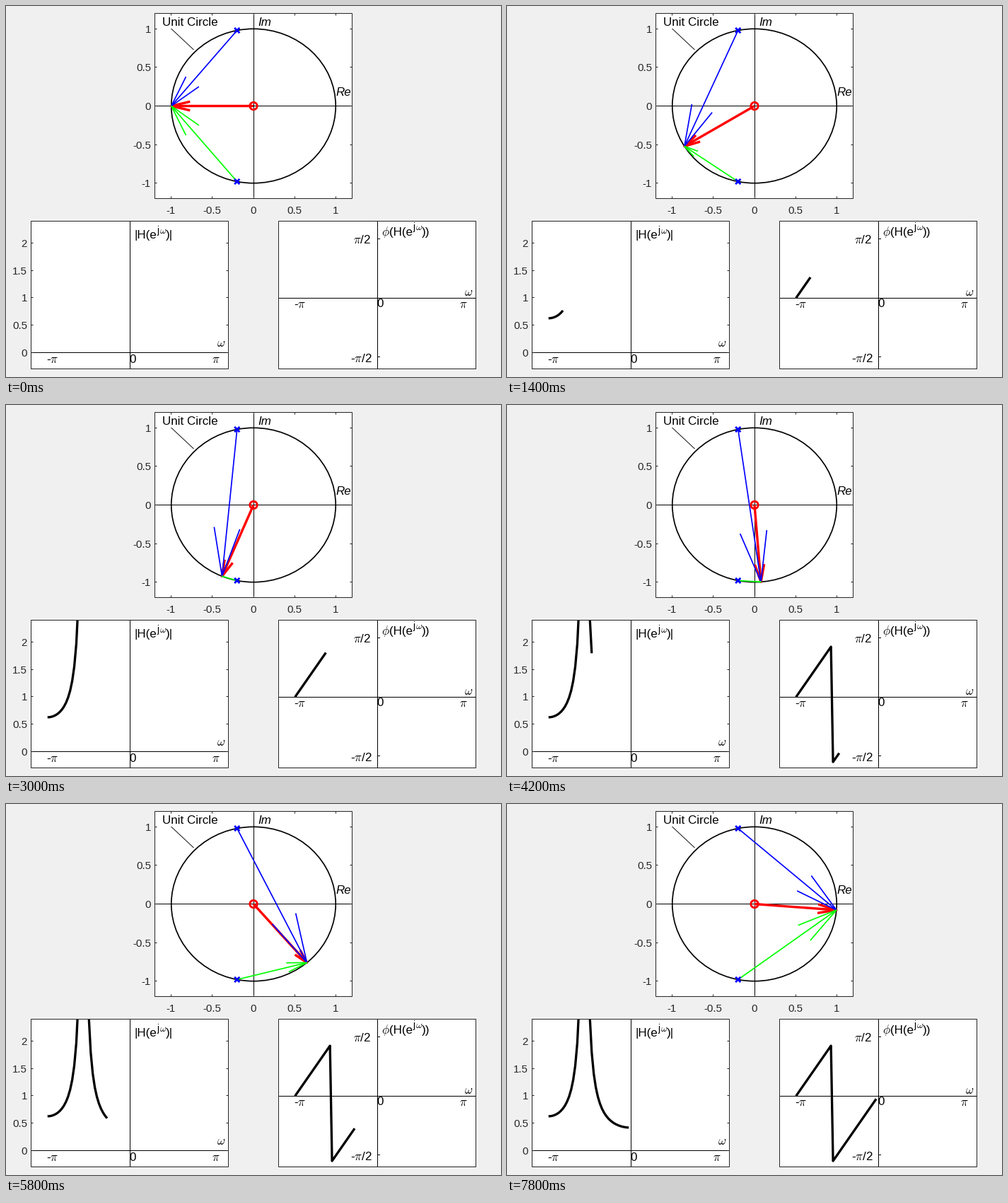
Write a matplotlib script that moves like this. It is 700x525 px and loops after 8 s.

```python
import numpy as np
import matplotlib.pyplot as plt
from matplotlib.animation import FuncAnimation
from matplotlib.patches import Rectangle, Ellipse, Circle

W, H, DPI = 700, 525, 100
FRAMES, INTERVAL = 40, 200
PT = 72 / DPI  # points per pixel
GRAY = (0.15, 0.15, 0.15)
LABEL, TICK, SUP = 17, 15, 13.8

plt.rcParams["font.family"] = "Liberation Sans"
plt.rcParams["mathtext.fontset"] = "cm"
plt.rcParams["axes.unicode_minus"] = False
plt.rcParams["path.snap"] = False

fig = plt.figure(figsize=(W / DPI, H / DPI), dpi=DPI, facecolor="#f0f0f0")
ax = fig.add_axes([0, 0, 1, 1])
ax.set_xlim(0, W)
ax.set_ylim(H, 0)
ax.axis("off")


class Panel:
    """A white box on the stage that maps data to stage pixels."""

    def __init__(self, left, top, width, height, xlim, ylim):
        self.box = left, top, width, height
        self.xlim, self.ylim = xlim, ylim
        ax.add_patch(Rectangle((left, top), width, height, fc="white", ec="none", zorder=0))
        self.clip = Rectangle((left, top), width, height, fc="none", ec=GRAY,
                              lw=PT, zorder=6)
        ax.add_patch(self.clip)

    def px(self, x, y):
        left, top, width, height = self.box
        (x0, x1), (y0, y1) = self.xlim, self.ylim
        return (left + (np.asarray(x) - x0) / (x1 - x0) * width,
                top + (y1 - np.asarray(y)) / (y1 - y0) * height)

    def crisp(self, x, y):
        """Centre of the pixel that holds a data point."""
        return [np.floor(float(v) + 1e-6) + 0.5 for v in self.px(x, y)]

    def axes_lines(self):
        left, top, width, height = self.box
        x, y = self.crisp(0, 0)
        stroke([left, left + width], [y, y])
        stroke([x, x], [top, top + height])


def stroke(xs, ys, color="black", width=1.0, z=2):
    return ax.plot(xs, ys, color=color, lw=width * PT, zorder=z,
                   solid_capstyle="butt", solid_joinstyle="round")[0]


def write(x, y, s, size=LABEL, color="black", ha="left", **kw):
    ax.text(x, y, s, fontsize=size * PT, color=color, ha=ha, va="baseline", zorder=7, **kw)


def y_ticks(panel, values):
    left, _, width, _ = panel.box
    for v in values:
        y = panel.crisp(0, v)[1]
        stroke([left, left + 3], [y, y], GRAY)
        stroke([left + width - 3, left + width], [y, y], GRAY)
        write(left - 5.5, y + 5.5, f"{v:g}", TICK, GRAY, "right")


def x_ticks(panel, values):
    _, top, _, height = panel.box
    for v in values:
        x = panel.crisp(v, 0)[0]
        stroke([x, x], [top, top + 3], GRAY)
        stroke([x, x], [top + height - 3, top + height], GRAY)
        write(x - 0.5, top + height + 21.8, f"{v:g}", TICK, GRAY, "center")


def response_label(x, y, head, tail):
    """Label with a raised j-omega between head and tail; x is where e ends."""
    write(x, y, head, ha="right")
    write(x, y - 7.5, "j", SUP)
    write(x + 3.4, y - 7.5, r"$\omega$", SUP)
    write(x + 12.4, y, tail)


LIM = (-1.2, 1.2)
W_LIM = (-1.2 * np.pi, 1.2 * np.pi)
plane = Panel(210.5, 10.5, 279, 262, LIM, LIM)
mag = Panel(35.5, 304.5, 279, 209, W_LIM, (-0.3, 2.4))
phase = Panel(385.5, 304.5, 279, 209, W_LIM, (-0.6 * np.pi, 0.65 * np.pi))

# Pole-zero plane
plane.axes_lines()
halves = (-1, -0.5, 0, 0.5, 1)
x_ticks(plane, halves)
y_ticks(plane, halves)
ax.add_patch(Ellipse((350, 141.5), 2 * 279 / 2.4, 2 * 262 / 2.4, fc="none", ec="black",
                     lw=1.7 * PT, zorder=2))
write(221.3, 28, "Unit Circle")
write(356, 28, "Im", style="italic")
write(466.8, 127, "Re", style="italic")
stroke([233.5, 265.5], [32, 62], width=0.9)

POLE = -0.2 + 1j * np.sqrt(0.96)
for p in (POLE, POLE.conjugate()):
    x, y = plane.px(p.real, p.imag)
    for s in (-1, 1):
        stroke([x - 3.6, x + 3.6], [y - 3.6 * s, y + 3.6 * s], "blue", 2.8, z=5)
ax.add_patch(Circle((350, 141.5), 5.2, fc="none", ec="red", lw=2.9 * PT, zorder=5))

# Magnitude
mag.axes_lines()
y_ticks(mag, (0, 0.5, 1, 1.5, 2))
response_label(213.7, 329.5, "|H(e", ")|")
write(57, 505, r"-$\pi$")
write(174.5, 505, "0")
write(291, 505, r"$\pi$")
write(298.4, 482, r"$\omega$")

# Phase
phase.axes_lines()
for v in (-np.pi / 2, np.pi / 2):
    x, y = phase.crisp(0, v)
    stroke([x, x + 3.5], [y, y])
write(531, 324.5, r"$\phi$")
response_label(575.3, 324.5, "(H(e", "))")
write(491.3, 336, r"$\pi$/2")
write(487.3, 504, r"-$\pi$/2")
write(407, 427, r"-$\pi$")
write(524.5, 426, "0")
write(641.3, 427, r"$\pi$")
write(648.4, 410, r"$\omega$")


class Arrow:
    """Vector with an open head that shrinks with its larger component."""

    def __init__(self, start, color, width, head, z):
        self.start, self.head = start, head
        self.shaft = stroke([], [], color, width, z)
        self.barbs = stroke([], [], color, width, z)

    def point_to(self, tip):
        v = tip - self.start
        size = self.head * min(1, max(abs(v.real), abs(v.imag)))
        ends = np.array([tip - size * v * (1 + 0.25j), tip, tip - size * v * (1 - 0.25j)])
        line = np.array([self.start, tip])
        self.shaft.set_data(*plane.px(line.real, line.imag))
        self.barbs.set_data(*plane.px(ends.real, ends.imag))


arrows = [Arrow(0j, "red", 3.4, 0.228, 3),
          Arrow(POLE, "blue", 1.7, 0.328, 3.1),
          Arrow(POLE.conjugate(), "lime", 1.7, 0.328, 3.2)]

omega = -np.pi + np.arange(FRAMES) * np.pi / 40
z = np.exp(1j * omega)
response = z**2 / ((z - POLE) * (z - POLE.conjugate()))
mag_xy = mag.px(omega, np.abs(response))
phase_xy = phase.px(omega, np.angle(response))

curves = []
for panel, (xs, ys) in ((mag, mag_xy), (phase, phase_xy)):
    line = stroke([], [], "black", 3.3, 4)
    line.set_clip_path(panel.clip)
    curves.append((line, xs, ys))


def draw(k):
    for arrow in arrows:
        arrow.point_to(z[k])
    for line, xs, ys in curves:
        line.set_data(xs[:k + 1], ys[:k + 1])
    return []


anim = FuncAnimation(fig, draw, frames=FRAMES, interval=INTERVAL, repeat=True, repeat_delay=0)
plt.show()
```
